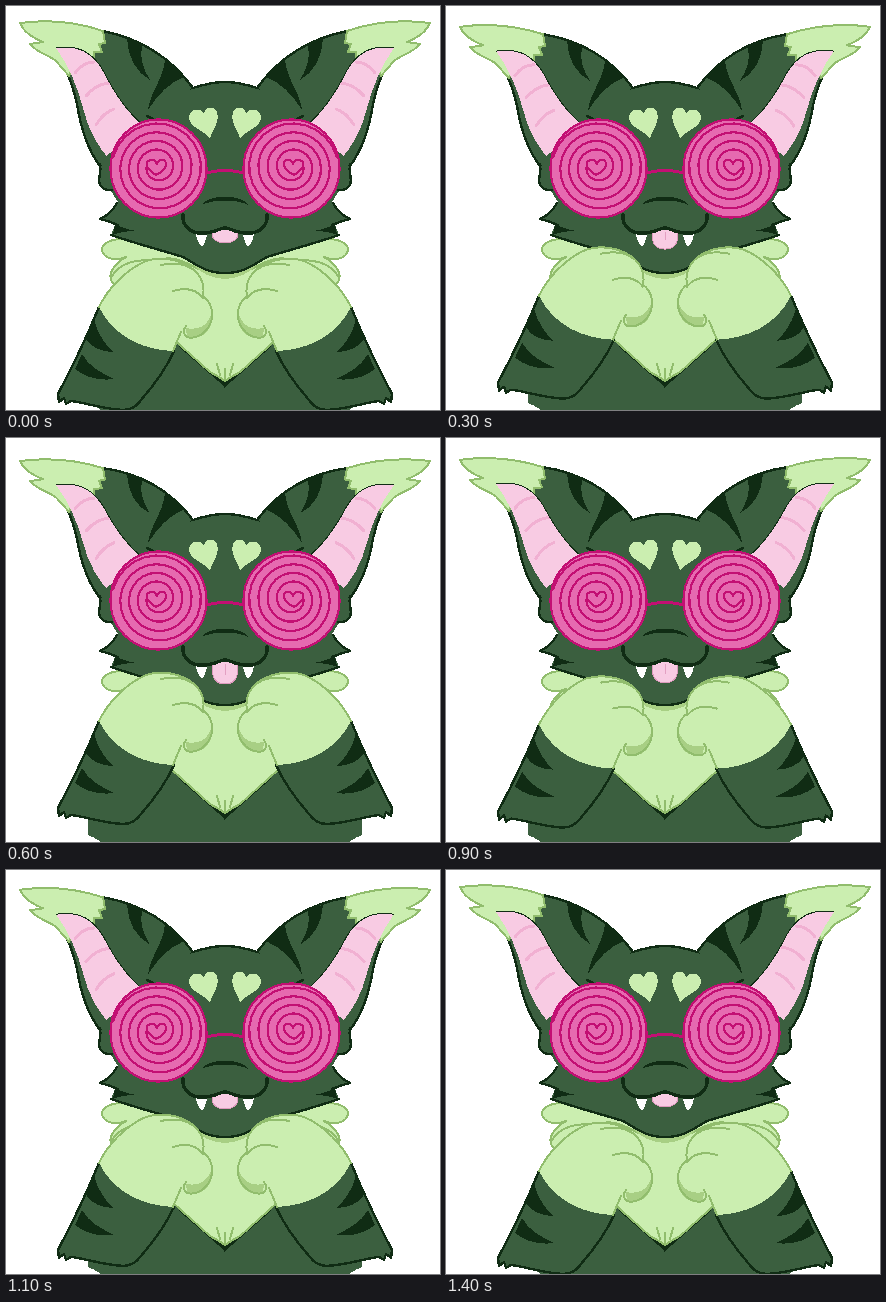
Write an HTML page that moves like this. It is 434 px wide and 404 px high and loops after 1600 ms.

```html
<!DOCTYPE html>
<html lang="en">
<head>
<meta charset="utf-8">
<title>Happy bat</title>
<style>
  html, body { margin: 0; width: 100%; height: 100%; overflow: hidden; background: #fff; }
  svg { display: block; width: 434px; height: 404px; }
  path, ellipse { stroke-linecap: round; stroke-linejoin: round; }
  .fur { fill: #3b5f3f; }
  .dark { fill: #102c14; }
  .light { fill: #cbeeb0; }
  .shade { fill: #a8cf84; }
  .pink { fill: #f8cbe3; }
  .ink { stroke: #102c14; stroke-width: 2.4; }
  .moss { stroke: #91bd6d; stroke-width: 2; }
  .line { fill: none; }
  .rose { stroke: #f1b0d2; stroke-width: 3; }
  .hot { stroke: #c30f73; stroke-width: 2.2; }
</style>
</head>
<body>
<svg viewBox="0 0 434 404" shape-rendering="crispEdges">
  <g id="half">
    <g id="ear"></g>

    <!-- torso and bib -->
    <path class="fur" d="M100 300 L82 345 V397 Q88 399 95 404 H220 V300Z"/>
    <path class="dark" d="M172 340 L220 382 V368 L185 338Z"/>
    <path class="light moss" d="M114 233 C101 234 93 240 97 247 C100 253 111 255 120 251 C108 258 101 268 106 276 L130 305 L166 332 L204 366 L213 371 L219 375 V236"/>
    <path class="light" d="M190 255 H220 V373 L200 357Z"/>
    <path class="line moss" d="M105 272 C112 257 132 252 150 255 C164 248 180 256 192 263 M211 358 L214 369 M219 363 V374"/>
    <path class="shade" d="M184 256 C195 268 207 273 220 273 V262Z"/>

    <!-- head -->
    <path class="fur" d="M220 76 C207 76 196 79 187 82 L150 112 L100 150 L93 166 C92 177 96 183 105 185 L112 196 Q105 208 94 213 L109 219 L105 229 C128 236 151 244 177 251 C190 259 201 267 220 267Z"/>
    <path class="dark" d="M109 218 Q118 223 130 225 Q116 225 107 229Z"/>
    <path class="line ink" d="M219 76 C207 76 196 79 187 82 M94 158 C96 168 91 172 94 179 Q98 185 106 184 M111 197 Q105 208 94 213 Q103 215 112 219 M105 229 C128 237 151 243 177 251 C190 258 199 267 219 267 M141 110 L147 113"/>
    <path class="light" d="M204 133 C199 124 182 122 183 110 C185 102 195 102 198 107 C199 100 209 100 211 106 C214 118 206 122 204 133Z"/>
    <path class="dark" d="M195 199 C203 191 210 191 220 191 V195 C209 194 204 196 195 199Z"/>

    <!-- glasses -->
    <path class="line hot" d="M200 167 Q209 164.5 219 164.5" style="stroke-width:3"/>
    <ellipse class="hot" cx="152.5" cy="162.5" rx="48" ry="49" fill="#e66ab0"/>
    <path id="spiral" class="line hot"/>

    <!-- arm -->
    <g id="arm">
      <path class="fur ink" d="M93 283 C84 305 69 338 52 370 L53 378 L58 374 L60 380 L65 377 C81 379 97 385 117 386 Q128 386 135 376 C149 360 160 345 168 327Z"/>
      <path class="dark" d="M88 296 C92 311 100 321 107 328 C96 328 86 324 80 315Z M76 330 C83 343 96 349 108 355 C94 357 80 354 69 345Z"/>
      <path class="light" d="M93 283 C101 266 119 246 140 237 C159 231 184 237 194 253 Q199 262 197 272 C205 278 208 288 205 298 C201 309 190 316 181 313 L174 311 L167 327 C139 326 108 314 93 283Z"/>
      <path class="shade" d="M180 304 Q200 308 206 288 C209 305 195 318 181 313Z"/>
      <path class="line moss" d="M93 283 C101 266 119 246 140 237 C159 231 184 237 194 253 Q199 262 197 272 C205 278 208 288 205 298 C201 309 190 316 181 313 Q175 309 180 302 M167 267 Q187 261 197 274 M167 327 L175 308 M155 241 Q175 237 186 245"/>
    </g>
  </g>
  <use href="#half" transform="matrix(-1 0 0 1 438 0)"/>

  <path id="tongue" class="pink" stroke="#dd9bbd"/>
  <path id="crease" class="line" stroke="#e3a0c2"/>
  <g id="mouth">
    <path d="M190 228 L201 228 Q200 236 196 241 Q191 236 190 228Z" fill="#fff"/>
    <path class="line ink" d="M177 209 C176 222 187 228 198 227 C208 227 214 222 219 222" style="stroke-width:3.4"/>
  </g>
  <use href="#mouth" transform="matrix(-1 0 0 1 438 0)"/>
</svg>
<script>
  const $ = id => document.getElementById(id);

  // Ear layers: class, path (absolute coordinates only)
  const earLayers = [
    ['fur ink', 'M97 25 C132 32 163 49 187 82 L150 130 L104 165 L94 160 C82 144 75 124 71 98 Q67 80 61 67 L60 45Z'],
    ['dark', 'M121 33 L136 39 C133 53 138 64 144 74 C130 66 122 52 121 33Z M159 54 L178 71 C163 77 152 88 142 104 C144 86 157 74 159 54Z'],
    ['light moss', 'M97 25 C71 16 43 13 14 17 C18 27 27 32 37 36 L24 38 C31 47 43 49 50 55 L63 70 L72 48 L88 54 L88 46 L96 46 L93 38 L99 37Z'],
    ['pink', 'M50 42 C74 38 88 48 98 66 C107 84 118 103 136 118 L120 160 L105 155 C93 143 82 124 77 102 C72 82 62 58 50 42Z'],
    ['line rose', 'M69 67 Q77 56 88 56 M80 90 Q90 78 103 77 M90 119 Q97 107 108 103'],
    ['line ink', 'M50 42 C74 38 88 48 98 66 C107 84 118 103 136 118']
  ].map(([cls, d]) => {
    const el = document.createElementNS('http://www.w3.org/2000/svg', 'path');
    el.setAttribute('class', cls);
    if (cls === 'line ink') el.style.strokeWidth = 1;
    $('ear').append(el);
    return { el, d };
  });

  // The tip sinks while the base stays put
  function bend(d, amount) {
    return d.replace(/(\d+) (\d+)/g, (_, x, y) => {
      const reach = Math.max(0, 160 - y) / 143 * Math.min(1, (187 - x) / 100);
      return `${x} ${(+y + 6 * amount * reach).toFixed(2)}`;
    });
  }

  // A heart whose left side unwinds into the rings
  function spiralPath() {
    let d = 'M141 160 C139 154 148 151 151 158 C153 152 161 153 160 159 C159 164 154 167 150 169 C146 166 142 164 141 160';
    for (let a = 0; a <= 4; a += 0.04) {
      const r = 11 + 9 * a, angle = Math.PI * (1 - 2 * a);
      d += ` L${(151.5 + a / 4 + r * Math.cos(angle)).toFixed(1)} ${(161 + a / 3 + r * Math.sin(angle)).toFixed(1)}`;
    }
    return d;
  }
  $('spiral').setAttribute('d', spiralPath());

  const LOOP = 1600;
  const lift = [0, .23, .45, .63, .8, .93, 1, .8, .63, .45, .23, .08, 0];
  const lick = [0, .25, .55, .68, .8, .92, 1, .87, .5, .22, .1, .03, 0];

  function stepAt(t) {
    if (t < 900) return Math.min(6, Math.floor(t / 100));
    return Math.min(12, Math.floor(t / 100) - 2);
  }

  function render(t) {
    const step = stepAt(t), up = lift[step], out = lick[step];
    $('arm').setAttribute('transform', `translate(0 ${(18 * (1 - up)).toFixed(2)})`);
    for (const { el, d } of earLayers) el.setAttribute('d', bend(d, up));
    const tip = 237 + 9 * out;
    $('tongue').setAttribute('d', `M207 226 C204 ${tip - 4} 212 ${tip} 219 ${tip} C226 ${tip} 234 ${tip - 4} 231 226 Q219 219 207 226Z`);
    $('crease').setAttribute('d', out > .4 ? `M219 226 V${tip - 9}` : '');
  }

  const start = performance.now();
  function tick(now) {
    render(Math.max(0, now - start) % LOOP);
    requestAnimationFrame(tick);
  }
  render(0);
  requestAnimationFrame(tick);
</script>
</body>
</html>
```
